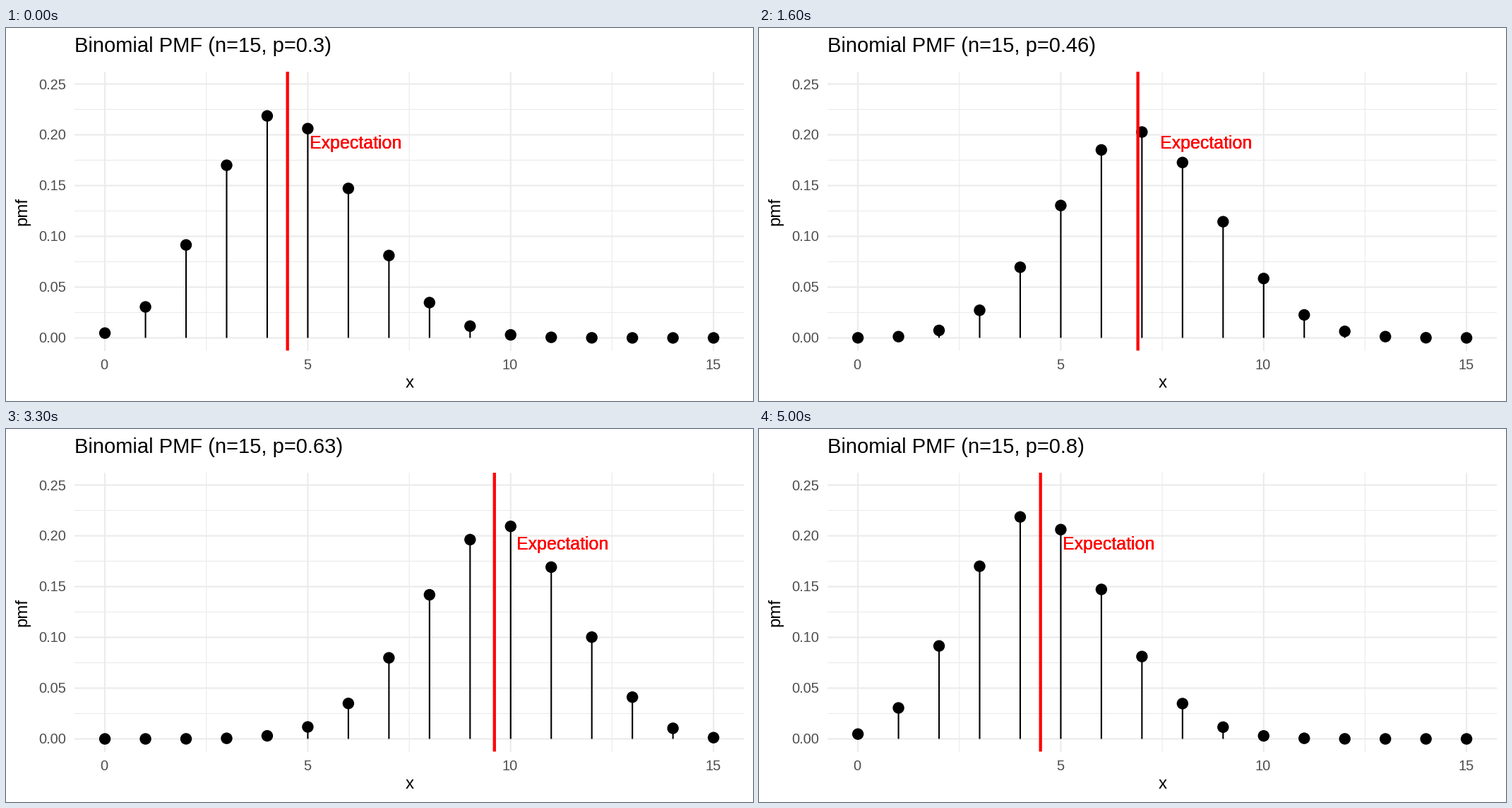
A matplotlib script that plays this animation: 1058 by 529 pixels, repeating every 5100 ms.

```python
from math import comb

import matplotlib.pyplot as plt
import numpy as np
from matplotlib.animation import FuncAnimation
from matplotlib.patches import Ellipse

W, H, DPI = 1058, 529, 64
PT = 72 / DPI  # points per pixel
LEFT, RIGHT, TOP, BOTTOM = 97, 1045.2, 61.5, 457.5
N, P0, STEPS = 15, 0.3, 50
FRAMES = STEPS + 1
DOT = 16.4
COPIES = 4  # stacked labels give the heavy text edges

UNIT_X = (RIGHT - LEFT) / (1.1 * N)
UNIT_Y = (BOTTOM - TOP) / 0.275

plt.rcParams["font.family"] = "Liberation Sans"
fig = plt.figure(figsize=(W / DPI, H / DPI), dpi=DPI, facecolor="white")
ax = fig.add_axes([LEFT / W, 1 - BOTTOM / H, (RIGHT - LEFT) / W, (BOTTOM - TOP) / H])
ax.set(xlim=(-0.05 * N, 1.05 * N), ylim=(-0.0125, 0.2625))
ax.axis("off")

ks = np.arange(N + 1)
coef = np.array([comb(N, k) for k in ks])


def px_x(x):
    return LEFT + (x + 0.05 * N) * UNIT_X


def px_y(y):
    return BOTTOM - (y + 0.0125) * UNIT_Y


def write(x, y, s, size, color="black", va="baseline", **kw):
    return fig.text(x / W, 1 - y / H, s, fontsize=size * PT, color=color, va=va, **kw)


def grid(xs, ys, width):
    style = dict(color="#EBEBEB", lw=width * PT, zorder=1, snap=False)
    for x in xs:
        ax.axvline(x, **style)
    for y in ys:
        ax.axhline(y, **style)


def bars(width, **kw):
    return ax.vlines([], [], [], lw=width * PT, snap=False, **kw)


y_ticks = np.arange(6) * 0.05
grid((2.5, 7.5, 12.5), y_ticks[:-1] + 0.025, 1.1)
grid((0, 5, 10, 15), y_ticks, 2.1)

for y in y_ticks:
    write(85.5, px_y(y) + 7, f"{y:.2f}", 20, "#4D4D4D", ha="right")
for x in (0, 5, 10, 15):
    write(px_x(x) - 0.8, 484, str(x), 20, "#4D4D4D", ha="center")
write(571.5, 510, "x", 24, ha="center")
write(23.6, 259.6, "pmf", 24, rotation=90, ha="center", va="center")

title = write(LEFT, 34, "", 29.15)
stems = bars(2.1, color="black", zorder=2)
dots = [ax.add_patch(Ellipse((0, 0), DOT / UNIT_X, DOT / UNIT_Y, fc="black", lw=0,
                             zorder=3, clip_on=False))
        for _ in range(2 * (N + 1))]
means = bars(4.3, color="red", zorder=4, transform=ax.get_xaxis_transform())
labels = [[write(0, 171, "Expectation", 25, "red") for _ in range(COPIES)]
          for _ in range(2)]


def states(frame):
    """Probabilities whose rounded time falls on this frame."""
    slot = frame % STEPS
    return [P0 + i / 100 for i in range(FRAMES) if (98 * i + 50) // 100 == slot]


def update(frame):
    ps = states(frame)
    title.set_text(f"Binomial PMF (n={N}, p={round(P0 + frame / 100, 2):g})")
    points = [(k, v) for p in ps
              for k, v in zip(ks, coef * p**ks * (1 - p)**(N - ks))]
    stems.set_segments([[(k, 0), (k, v)] for k, v in points])
    for j, dot in enumerate(dots):
        dot.set_visible(j < len(points))
        if j < len(points):
            dot.set_center(points[j])
    means.set_segments([[(N * p, 0), (N * p, 1)] for p in ps])
    for j, group in enumerate(labels):
        for t in group:
            t.set_visible(j < len(ps))
            if j < len(ps):
                t.set_x((px_x(N * ps[j]) + 31.2) / W)
    return []


anim = FuncAnimation(fig, update, frames=FRAMES, interval=100, repeat=True,
                     repeat_delay=0, blit=False)
plt.show()
```
